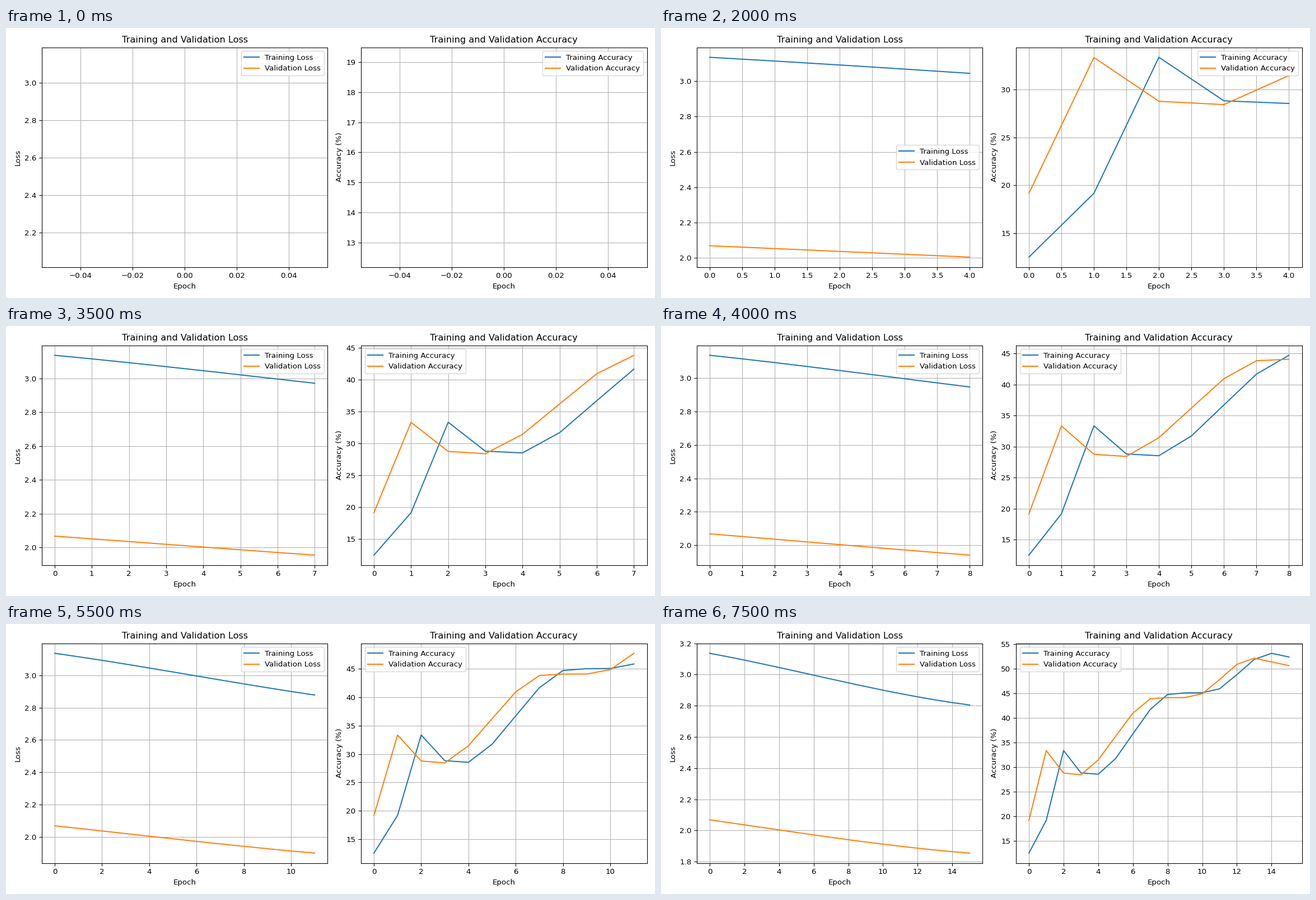
These frames come from a looping animation (1159x483 px, 8 s). A matplotlib script:

```python
import matplotlib.pyplot as plt
import numpy as np
from matplotlib.animation import FuncAnimation

EPOCHS = 16
INTERVAL = 500
DPI = 1159 / 12  # 1159 x 483 pixels

epoch = np.arange(EPOCHS)


def decay(start, a, b, c):
    """Loss falling along a cubic."""
    return start - epoch * (a + epoch * (b + epoch * c))


def rise(begin, end):
    """Smooth step from 0 to 1."""
    t = np.clip((epoch - begin) / (end - begin), 0, 1)
    return t * t * (3 - 2 * t)


train_loss = decay(3.1362, 0.0205, 0.00073, -0.0000415)
val_loss = decay(2.0678, 0.0158, 0.00015, -0.000017)

# Validation: a warm-up wobble, two smooth climbs, then a slow decline.
wobble = np.interp(epoch, [0, 1, 2, 3], [-8.94, 5.24, 0.67, 0])
val_acc = (28.1 + wobble + 16 * rise(2.6, 7.35) + 8 * rise(9.3, 12.9)
           - 0.75 * np.maximum(epoch - 13, 0))

# Training trails validation by one epoch and gains up to one point on it.
gain = 1 / (1 + np.exp(6 - epoch))
train_acc = np.append(12.51, val_acc[:-1] + gain[1:])

fig, (loss_ax, acc_ax) = plt.subplots(1, 2, figsize=(12, 5.0009), dpi=DPI)


def draw_panel(ax, n, name, ylabel, train, val):
    ax.clear()
    ax.plot(epoch[:n], train[:n], label=f"Training {name}")
    ax.plot(epoch[:n], val[:n], label=f"Validation {name}")
    ax.set_title(f"Training and Validation {name}")
    ax.set_xlabel("Epoch")
    ax.set_ylabel(ylabel)
    ax.legend(loc="best")
    ax.grid(True)


def update(i):
    draw_panel(loss_ax, i + 1, "Loss", "Loss", train_loss, val_loss)
    draw_panel(acc_ax, i + 1, "Accuracy", "Accuracy (%)", train_acc, val_acc)


update(0)
fig.tight_layout()

anim = FuncAnimation(fig, update, frames=EPOCHS, interval=INTERVAL,
                     repeat=True, repeat_delay=0)
plt.show()
```
